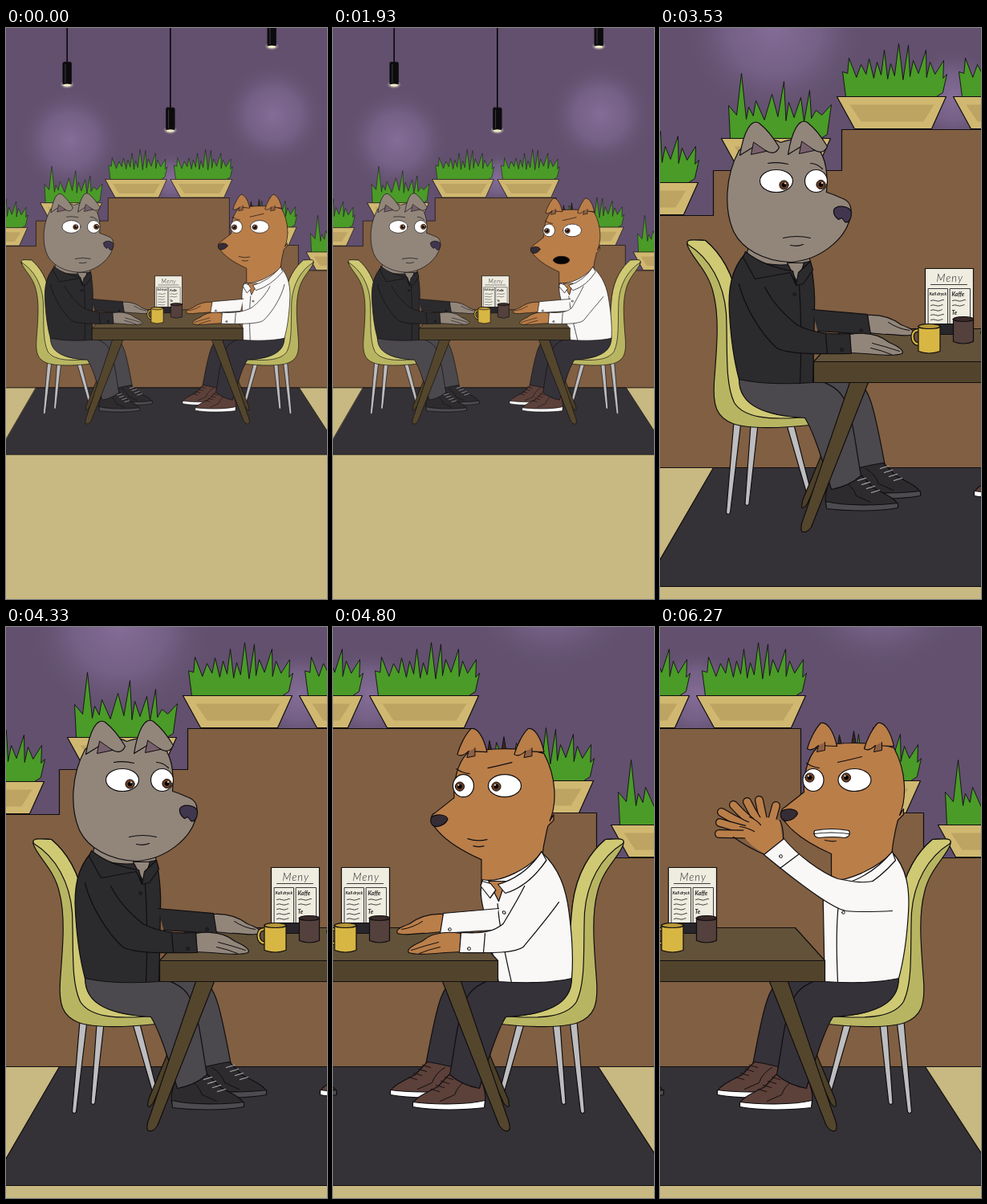
Animation, 400 px wide and 711 px high, one loop 6.34 s. Source, as an HTML page:

```html
<!DOCTYPE html>
<html>
<head>
<meta charset="utf-8">
<style>
html, body { margin: 0; width: 100%; height: 100%; overflow: hidden; background: #62506e; }
svg { display: block; width: 100vw; height: 100vh; }
text { font-family: Lato, "Open Sans", sans-serif; font-style: italic; fill: #222; stroke: none; }
</style>
</head>
<body>
<svg id="stage" viewBox="0 0 400 711" stroke="#100e10" stroke-width="1.2" stroke-linejoin="round" stroke-linecap="round"></svg>
<script>
const LOOP = 6340, ZOOM = 1.78;
const CUT_LEFT = 2270, CUT_RIGHT = 4400;

const path = (d, fill = 'none', more = '') => `<path d="${d}" fill="${fill}" ${more}/>`;
const oval = (x, y, rx, ry, fill, more = '') =>
  `<ellipse cx="${x}" cy="${y}" rx="${rx}" ry="${ry}" fill="${fill}" ${more}/>`;
const group = (inner, transform) => `<g transform="${transform}">${inner}</g>`;
const flip = inner => group(inner, 'matrix(-1 0 0 1 715 0)');
const both = inner => inner + flip(inner);
const ease = (t, a, b) => {
  const u = Math.min(1, Math.max(0, (t - a) / (b - a)));
  return u * u * (3 - 2 * u);
};

// Blend two path strings that share the same commands.
function mix(a, b, u) {
  const to = b.match(/-?[\d.]+/g);
  let i = 0;
  return a.replace(/-?[\d.]+/g, n => (+n + (to[i++] - n) * u).toFixed(1));
}

// ---------- room ----------

const BUSHY = [[227, 54], [235, 37], [250, 45], [260, 38], [270, 42], [279, 27], [287, 44],
  [297, 19], [309, 21], [315, 40], [331, 27], [336, 42], [353, 40], [357, 57]];
const TALL = [[229, 44], [245, 4], [254, 46], [263, 38], [283, 30], [298, 14], [304, 40],
  [319, 34], [330, 25], [338, 50], [357, 43]];

function grass(tips) {
  let d = 'M231 85';
  tips.forEach(([x, y], i) => {
    const next = tips[i + 1] || [352, 85];
    const vx = 288 + ((x + next[0]) / 2 - 288) * 0.96;
    const vy = i < tips.length - 1 ? 56 + (i * 5) % 9 : 80;
    d += `L${x} ${y}L${vx} ${vy}`;
  });
  return path(d + 'L344 85Z', '#4a9b28', 'stroke-width=".9"');
}

const planter = (x, y, tips) => group(
  grass(tips) +
  path('M220 85H356L338 125H242Z', '#d0b871') +
  path('M236 95H341L328 116H250Z', '#bda463', 'stroke="none"'), `translate(${x} ${y})`);

const glow = (x, y, r) => oval(x, y, r, r, 'url(#glow)', 'stroke="none"');

const lamp = (x, y) =>
  path(`M${x} -260V${y}`, 'none', 'stroke="#000" stroke-width="2.6"') +
  oval(x, y + 50, 16, 9, 'url(#bulb)', 'stroke="none"') +
  `<rect x="${x - 9.5}" y="${y}" width="19" height="50" rx="3" fill="#0c0b0d"/>` +
  path(`M${x - 4} ${y + 5}v40`, 'none', 'stroke="#39363c" stroke-width="2"') +
  oval(x, y + 51, 9, 3, '#eeeac6', 'stroke="none"');

const defs = `<defs>
  <radialGradient id="glow"><stop stop-color="#846d97"/><stop offset=".5" stop-color="#7b658d" stop-opacity=".75"/>
  <stop offset="1" stop-color="#62506e" stop-opacity="0"/></radialGradient>
  <radialGradient id="bulb"><stop stop-color="#f4f0cf"/><stop offset="1" stop-color="#f4f0cf" stop-opacity="0"/></radialGradient>
</defs>`;

const room =
  path('M-20 -260H740V560H-20Z', '#62506e') +
  glow(142, -2, 120) + glow(593, -58, 120) + glow(365, 85, 62) +
  lamp(135, -175) + lamp(364, -74) + lamp(589, -260) +
  path('M-20 233H66V177H226V126H495V231H648V287H740V547H-20Z', '#815f42') +
  planter(0, 0, BUSHY) + planter(145, 0, BUSHY) + planter(-144, 52, TALL) +
  planter(-309, 107, BUSHY) + planter(288, 106, BUSHY) + planter(446, 161, TALL) +
  path('M-20 547H740V1030H-20Z', '#c8b881') +
  path('M66 547H650L746 695H-20Z', '#343236');

// ---------- furniture, drawn for the left half and mirrored ----------

const chairLeg = (x1, y1, x2, y2) =>
  path(`M${x1 - 4.5} ${y1}L${x2 - 2.5} ${y2}Q${x2} ${y2 + 4} ${x2 + 2.5} ${y2}L${x1 + 4.5} ${y1}Z`, '#bdbdc0');

const chair =
  chairLeg(194, 490, 214, 580) + chairLeg(162, 494, 192, 604) +
  chairLeg(117, 494, 108, 592) + chairLeg(96, 490, 84.5, 603) +
  path('M34 271C31 262 40 263 56 264C74 279 92 305 97 345C101 380 101 410 98 437C105 470 130 483 180 484L186 494C150 498 110 499 90 492C70 484 65 470 67 440C70 400 74 360 66 330C60 302 40 287 34 271Z', '#b8b562') +
  path('M34 269C31 262 40 263 56 264C74 279 92 305 97 345C101 380 101 410 98 437C105 470 130 483 180 484C135 488 104 485 92 466C80 440 84 400 82 355C79 318 62 286 34 269Z', '#cfc974') +
  path('M226 470L238 470L183 592Q178 599 176 596L177 588Z', '#4d4028');

const tableLeg = path('M236 441H259L188 621Q181 630 176 626Q174 620 178 611Z', '#54462d');

const table = both(tableLeg) +
  path('M191 415L228 374H488L525 415Z', '#625239') +
  path('M191 415H525V441H191Z', '#52442c');

const scribble = (x, y, n) => Array.from({ length: n }, (_, i) =>
  path(`M${x} ${y + i * 6}q3 -1.4 6 0t6 0t${4 - i % 3} -1`, 'none', 'stroke-width=".8"')).join('');

const menu =
  path('M330 368H372V381H330Z', '#28262b') +
  path('M330 299H390V368H330Z', '#efece0') +
  '<text x="344" y="315" font-size="13" font-weight="300" letter-spacing="1">Meny</text>' +
  path('M337 319H382', 'none', 'stroke-width=".8"') +
  path('M334 324H358V368H334ZM361 324H386V368H361Z', 'none', 'stroke-width=".8"') +
  '<text x="335" y="332" font-size="5.2" font-weight="bold">Kall dryck</text>' +
  '<text x="363" y="333" font-size="7" font-weight="bold">Kaffe</text>' +
  '<text x="363" y="356" font-size="7" font-weight="bold">Te</text>' +
  scribble(337, 339, 5) + scribble(364, 339, 2) + scribble(364, 362, 1);

const mug = (x, y, w, h, fill, inside) =>
  path(`M${x} ${y}V${y + h}Q${x + w / 2} ${y + h + 5} ${x + w} ${y + h}V${y}Z`, fill) +
  oval(x + w / 2, y, w / 2, 3, inside);

const mugs =
  path('M322 376C311 374 312 394 322 393', 'none', 'stroke-width="4.6"') +
  path('M322 376C311 374 312 394 322 393', 'none', 'stroke="#d8b644" stroke-width="2.2"') +
  mug(321.5, 371, 27, 31, '#d8b644', '#b8993a') +
  mug(365, 362, 25, 28, '#54403d', '#3a2a29');

// ---------- dogs, both facing right ----------

const ear = (x, y, skin) => group(
  path('M99 158C104 128 113 112 123 118C132 125 142 138 148 148C144 157 137 156 131 152L117 147Z', skin) +
  path('M116 142L113 157L132 153Z', '#77606c', 'stroke-width="1"'), `translate(${x} ${y})`);

const smallEar = (x, skin) => group(
  path('M175 148C179 130 187 117 195 119C202 126 209 140 212 151Q207 155 198 147Z', skin) +
  path('M198 147L200 155L190 153V143', '#8f5f43', 'stroke-width="1"'), `translate(${x} 0)`);

const eye = (x, rx, px, py) =>
  oval(x, 190, rx, 14, '#fff') +
  oval(px, py, 5.6, 5.6, '#6b3d22', 'stroke-width="1"') +
  oval(px, py, 2.8, 2.8, '#000', 'stroke="none"') +
  oval(px + 1.5, py - 2, 1, 1, '#fff', 'stroke="none"');

const MOUTHS = {
  c: path('M175 257Q187 260 199 256M179 265Q185 267 192 265'),
  o: oval(177, 256, 18, 8.5, '#080506'),
  t: path('M164 253Q182 250 201 253Q199 260 190 257Q176 257 168 259Z', '#fff') +
     path('M176 265Q182 267 189 264'),
  b: path('M160 253Q182 249 203 253Q205 261 198 262Q180 260 165 262Q157 260 160 253Z', '#fff') +
     path('M160 257Q182 254 204 257M176 266Q182 267 190 265')
};

const grayHead = ({ skin, gaze }) =>
  path('M110 270L106 290L166 316L187 292L184 276Z', skin) +
  path('M98 152C80 185 80 225 90 250C100 275 130 290 162 291C200 289 228 262 235 241C240 225 238 215 225 211Q214 206 207 204C209 180 206 160 195 148C185 136 165 136 150 142C135 134 112 138 98 152Z', skin) +
  ear(0, 0, skin) + ear(60, -1, skin) +
  eye(194, 14, 200, 190 + gaze) + eye(144.5, 20.5, 154, 190.5 + gaze) +
  path('M134 168Q146 166 159 169M187 168Q195 168 202 175') +
  path('M216 226C220 219 236 221 238 229C238 238 234 243 230 241L226 236L222 238Q215 233 216 226Z', '#40374f') +
  path('M153 261Q170 257 187 261M162 270Q170 272 178 269');

const brownHead = ({ skin, gaze, mouth }) =>
  path('M151 147L154 129L157 147M169 147L172 134L174 147', '#3b2a22', 'stroke-width="1"') +
  path('M104 150C88 180 88 213 97 234L92 226L92 233L99 240Q105 262 107 285L160 338L182 318V282C200 274 226 260 239 243C246 236 246 226 240 224L216 205C217 185 212 162 200 150C175 142 130 142 104 150Z', skin) +
  smallEar(-71, skin) + smallEar(0, skin) +
  eye(204.5, 13, 209, 190 + gaze) + eye(153, 20.5, 163.5, 190 + gaze) +
  path('M144 161Q160 165 174 168M197 175Q206 174 213 169') +
  path('M224 232C225 225 239 225 244 229C247 234 244 241 238 241Q228 240 224 232Z', '#352c36') +
  MOUTHS[mouth];

const shoe = ({ shoe, sole }) =>
  path('M210 565C205 580 205 590 207 594C230 599 275 599 296 596C297 588 285 582 265 572L250 556C235 558 220 562 210 565Z', shoe) +
  path('M206 589C230 595 275 594 296 591V597C270 602 230 601 207 598Z', sole) +
  path('M228 563Q240 570 244 582L262 590', 'none', 'stroke-width="1"') +
  path('M246 563l10 -3M251 568l10 -3M257 573l10 -3M263 578l10 -3', 'none',
    `stroke="${sole === '#fff' ? '#221514' : '#aaa8ab'}" stroke-width="1.3"`);

const COLLARS = {
  high: 'M106 278L103 285L118 312L162 304L169 320L165 302Q130 297 106 278ZM187 290L190 301L178 318L169 320L172 304Z',
  open: 'M106 279L102 290Q130 322 161 331L168 320Q132 310 106 279ZM187 316L190 322L181 337L172 327L177 319Z'
};

// The throat is the low front end of the neckline.
const torso = ({ skin, shirt, collar, throat }) =>
  path(`M106 280C88 300 84 325 86 355C88 390 92 415 98 437C125 443 160 443 190 441L191 405L192 350C193 330 190 ${throat + 10} 186 ${throat}C165 ${throat + 5} 125 300 106 280Z`, shirt) +
  path(`M158 ${throat + 2}L171 ${throat + 27}L179 ${throat + 2}Z`, skin) +
  path(`M173 ${throat + 30}Q177 380 174 441`) +
  path(COLLARS[collar], shirt) +
  oval(167, throat + 41, 1.8, 1.8, shirt, 'stroke-width="1"');

const body = o => chair +
  path('M180 437L245 440C260 446 266 470 280 545Q266 554 250 552L215 470Z', o.pants) +
  group(shoe(o), 'translate(28 -15)') + shoe(o) +
  path('M98 437C98 470 130 482 180 485C190 500 200 530 213 574Q235 570 250 557C243 520 240 480 228 460C220 445 200 438 185 436Z', o.pants) +
  group(o.head(o), `translate(${32 * o.lean} ${8 * o.lean})`) +
  group(torso(o), `matrix(1 0 ${-0.21 * o.lean} 1 ${0.21 * 437 * o.lean} 0)`);

const FINGERS = [[272, 215], [287, 217], [304, 221], [319, 230], [321, 243], [322, 257], [251, 222]];

function openHand(skin) {
  const fingers = FINGERS.map(([x, y]) => {
    const d = `M262 258Q${262 + (x - 262) * 0.6} ${258 + (y - 258) * 0.5} ${x} ${y}`;
    return path(d, 'none', 'stroke-width="11"') + path(d, 'none', `stroke="${skin}" stroke-width="8.6"`);
  }).join('');
  return fingers +
    path('M243 264L246 241Q262 234 278 238Q293 246 292 259Q284 272 265 282Z', skin, 'stroke="none"') +
    path('M242 265Q241 251 246 240M265 283Q288 273 304 261M278 254Q288 249 296 248M270 246Q276 239 284 236');
}

const tableHands = skin =>
  path('M258 357C275 356 288 360 300 369C313 374 318 377 315 381C305 385 290 380 280 381L260 379Z', skin) +
  path('M284 366Q296 374 310 376', 'none', 'stroke-width="1"');

const nearHand = skin =>
  path('M236 381C255 378 272 380 285 391C299 397 304 402 301 405C290 409 270 406 255 405L237 404Z', skin) +
  path('M264 392Q280 396 298 402M262 398Q276 401 288 406', 'none', 'stroke-width="1"');

function arms({ skin, shirt, lean, raise }) {
  const s = 30 * lean;
  const rest = `M${98 + s * 0.6} ${318 + s * 0.9}C${104 + s * 0.8} ${345 + s * 0.5} ${125 + s * 0.7} 380 ${145 + s * 0.5} 398C${160 + s * 0.4} 407 210 405 238 405L236 380C205 382 ${185 + s * 0.3} 377 ${170 + s * 0.5} 369C${155 + s * 0.8} 357 ${140 + s} 342 ${130 + s} 322`;
  const up = 'M106 353C125 354 145 355 164 353C180 350 215 325 266 283L241 263C225 283 195 305 174 313C150 318 140 318 130 316';
  const cuff = mix('M206 381L208 405', 'M222 282L246 300', raise);
  const down = raise < 0.3;
  const far = tableHands(skin) +
    path('M189 350L258 356L262 381L196 377', shirt) + oval(250, 376, 1.8, 1.8, shirt, 'stroke-width="1"');
  const hand = down ? nearHand(skin)
    : group(openHand(skin), `translate(${-16 * (1 - raise)} ${119 * (1 - raise)})`);
  const button = oval(226 + 19 * raise, 400 - 115 * raise, 1.9, 1.9, shirt, 'stroke-width="1"');
  return (down ? far : '') + hand + path(mix(rest, up, raise), shirt) + path(cuff) + button;
}

// ---------- timeline ----------

const SPEECH = 'cccotobtootcbto'.padEnd(37, 'c') + 'obotbototob';

const shot = t => {
  if (t < CUT_LEFT) return `matrix(${1 / ZOOM} 0 0 ${1 / ZOOM} .3 ${250 / ZOOM + 0.3})`;
  return t < CUT_RIGHT ? 'translate(.5 .5)' : 'translate(-319.5 .5)';
};

function scene(t) {
  const raise = ease(t, 4800, 5050);
  const gray = {
    head: grayHead, skin: '#92867b', shirt: '#2b2a2d', pants: '#4b494d', shoe: '#2d2b2e', sole: '#4d4b4f',
    collar: 'high', throat: 290, lean: 0, raise: 0, gaze: 4.5 * ease(t, 2950, 3080)
  };
  const brown = {
    head: brownHead, skin: '#ba7e49', shirt: '#f9f8f7', pants: '#35323a', shoe: '#5c403a', sole: '#fff',
    collar: 'open', throat: 314, lean: ease(t, 270, 520) - ease(t, 4750, 5000), raise, gaze: 1 - 4 * raise,
    mouth: SPEECH[Math.floor(t / 133.4)] || 'c'
  };
  return defs + group(
    room + body(gray) + flip(body(brown)) + table + menu +
    arms(gray) + (raise ? mugs + flip(arms(brown)) : flip(arms(brown)) + mugs), shot(t));
}

const stage = document.getElementById('stage');
const start = performance.now();
function draw() {
  stage.innerHTML = scene((performance.now() - start) % LOOP);
  requestAnimationFrame(draw);
}
draw();
</script>
</body>
</html>
```
